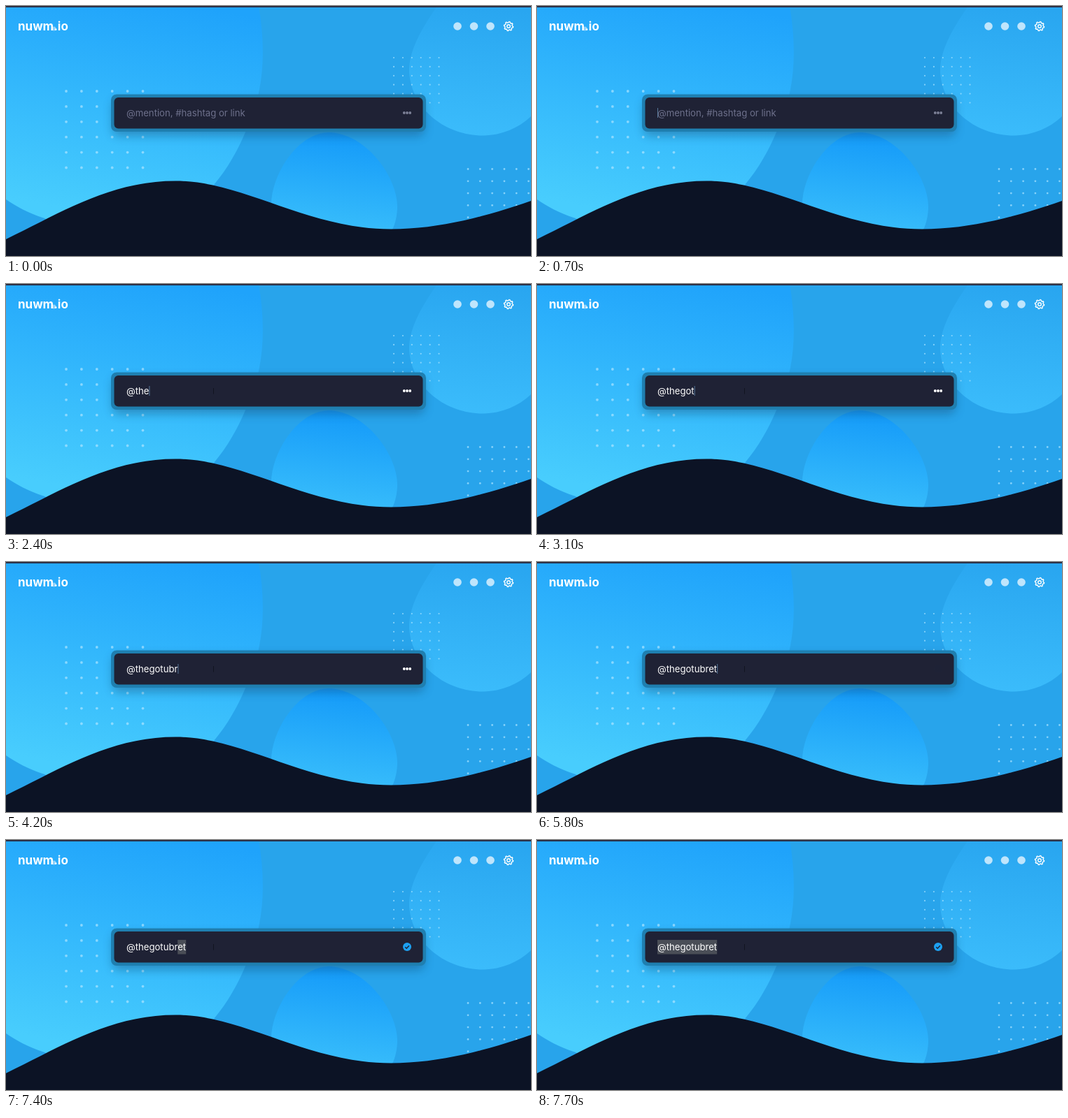
These frames come from a looping animation (750x358 px, 8 s). An HTML page:

```html
<!DOCTYPE html>
<html lang="en">
<head>
<meta charset="utf-8">
<title>Search</title>
<style>
  html, body { margin: 0; width: 100%; height: 100%; overflow: hidden; background: #28a4eb; }
  svg { display: block; width: 100vw; height: 100vh; }
  text { font: 13.15px Inter, sans-serif; }
  .logo { font-size: 17px; font-weight: 700; fill: #fff; }
</style>
</head>
<body>
<svg viewBox="0 0 750 358">
  <defs>
    <linearGradient id="large" gradientUnits="userSpaceOnUse" x1="220" y1="-10" x2="160" y2="305">
      <stop stop-color="#1fa3fb"/><stop offset="1" stop-color="#48cdfd"/>
    </linearGradient>
    <linearGradient id="corner" x1=".55" y1="0" x2=".45" y2="1">
      <stop stop-color="#29a6f0"/><stop offset="1" stop-color="#3bbcfb"/>
    </linearGradient>
    <linearGradient id="small" x1=".55" y1="0" x2=".4" y2="1">
      <stop stop-color="#149af9"/><stop offset="1" stop-color="#3bc0fb"/>
    </linearGradient>
    <filter id="blur" x="-10%" y="-60%" width="120%" height="220%"><feGaussianBlur stdDeviation="7"/></filter>
  </defs>

  <rect width="750" height="358" fill="#28a4eb"/>
  <path fill="url(#large)" d="M361 0C371 60 370 120 344 176C325 222 300 260 262 290C200 340 110 335 55 304C30 296 15 287 0 277V0Z"/>
  <path fill="url(#corner)" d="M616 0C592 35 575 65 576 95C580 150 630 186 682 185.5C708 185 732 175 750 158V0Z"/>
  <path fill="url(#small)" d="M379 285C378 245 415 181 462 181C515 183 560 245 559 290C558 305 555 315 550 324L400 330Z"/>
  <g id="dots" fill="#a5e2ff" fill-opacity=".75"></g>
  <path fill="#0c1325" d="M0 334C80 295 150 250.5 242 250.5C340 250.5 430 319.5 550 319.5C620 319.5 690 300 750 279V358H0Z"/>
  <rect width="750" height="2" fill="#2a3046"/>

  <circle cx="68.5" cy="32.5" r="3" fill="#8fd2fa"/>
  <text class="logo" x="17" y="34.5">nuwm.io</text>
  <g fill="#bfe5fc">
    <circle cx="645" cy="29" r="5.8"/><circle cx="668.5" cy="29" r="5.8"/><circle cx="692" cy="29" r="5.8"/>
  </g>
  <g fill="none" stroke="#fff" stroke-width="1.4" stroke-linejoin="round">
    <path id="gear"/><circle cx="718" cy="29" r="2.3"/>
  </g>

  <rect x="152" y="134" width="446" height="52" rx="9" fill="#0c3557" opacity=".35" filter="url(#blur)"/>
  <rect x="150" y="126.500" width="450" height="53.500" rx="8" fill="#1f7fb0"/>
  <rect x="154.500" y="131" width="441" height="44.500" rx="6" fill="#1f2235"/>
  <text id="hint" x="172" y="157.500" fill="#6d708b">@mention, #hashtag or link</text>
  <rect id="selection" y="143" height="20.500" fill="#4a4e57"/>
  <text id="typed" x="172" y="157.500" fill="#fff"></text>
  <rect id="caret" y="146" width="1" height="14" fill="#57789a"/>
  <path id="pointer" d="M296.500 149V157.500" stroke="#11131f"/>
  <g id="more">
    <circle cx="568.800" cy="153" r="1.900"/><circle cx="573" cy="153" r="1.900"/><circle cx="577.200" cy="153" r="1.900"/>
  </g>
  <g id="check">
    <circle cx="573" cy="153" r="6" fill="#1da1f2"/>
    <path d="M570.200 153.200L572.200 155.200L575.900 151.300" fill="none" stroke="#1f2235" stroke-width="1.500"/>
  </g>
</svg>
<script>
const $ = id => document.getElementById(id);
const LOOP = 8000, LEFT = 172;
const NAME = '@thegotubret';
// Moment at which each character of the name is typed
const KEYS = [1400, 1900, 2300, 2400, 2800, 3000, 3100, 3600, 4000, 4200, 4600, 4700];
// [time, characters selected from the end]
const SELECT = [[7000, 1], [7200, 2], [7500, 5], [7600, 9], [7700, 12]];

function dotGrid(x, y, step, rows, r) {
  for (let i = 0; i < rows * 6; i++) {
    const dot = document.createElementNS('http://www.w3.org/2000/svg', 'circle');
    dot.setAttribute('cx', x + i % 6 * step);
    dot.setAttribute('cy', y + Math.floor(i / 6) * step);
    dot.setAttribute('r', r);
    $('dots').append(dot);
  }
}
dotGrid(86, 122, 21.9, 6, 1.9);
dotGrid(554, 74, 12.9, 6, 1.1);
dotGrid(660, 233.5, 17.3, 5, 1.4);

const gear = [];
for (let i = 0; i < 32; i++) {
  const angle = (i - 1.5) / 32 * Math.PI * 2, r = i % 4 < 2 ? 5.2 : 6.6;
  gear.push(`${718 + r * Math.cos(angle)} ${29 + r * Math.sin(angle)}`);
}
$('gear').setAttribute('d', `M${gear.join('L')}Z`);

const clamp = v => Math.max(0, Math.min(1, v));
const show = (id, on) => $(id).style.visibility = on ? 'visible' : 'hidden';

function draw(t) {
  const count = KEYS.filter(k => k <= t).length;
  const typed = $('typed');
  if (typed.textContent.length !== count) typed.textContent = NAME.slice(0, count);
  const width = count ? typed.getComputedTextLength() : 0;

  const selected = SELECT.reduce((n, [time, chars]) => time <= t ? chars : n, 0);
  const start = selected && selected < count ? typed.getSubStringLength(0, count - selected) : 0;
  $('selection').setAttribute('x', LEFT + start);
  $('selection').setAttribute('width', selected ? width - start : 0);

  const lastKey = count ? KEYS[count - 1] : 600;
  const blink = Math.floor(Math.max(0, t - lastKey - 100) / 500) % 2;
  $('caret').setAttribute('x', LEFT + width);
  show('caret', t >= 700 && !blink && !selected);
  show('hint', !count);
  show('pointer', count);

  const lit = clamp((t - 1400) / 600);
  $('more').setAttribute('fill', `rgb(${[125, 129, 151].map(c => Math.round(c + (255 - c) * lit))})`);
  show('more', t < 5800);
  $('check').setAttribute('opacity', clamp((t - 5800) / 200));
}

function frame() {
  draw(performance.now() % LOOP);
  requestAnimationFrame(frame);
}
frame();
</script>
</body>
</html>
```
